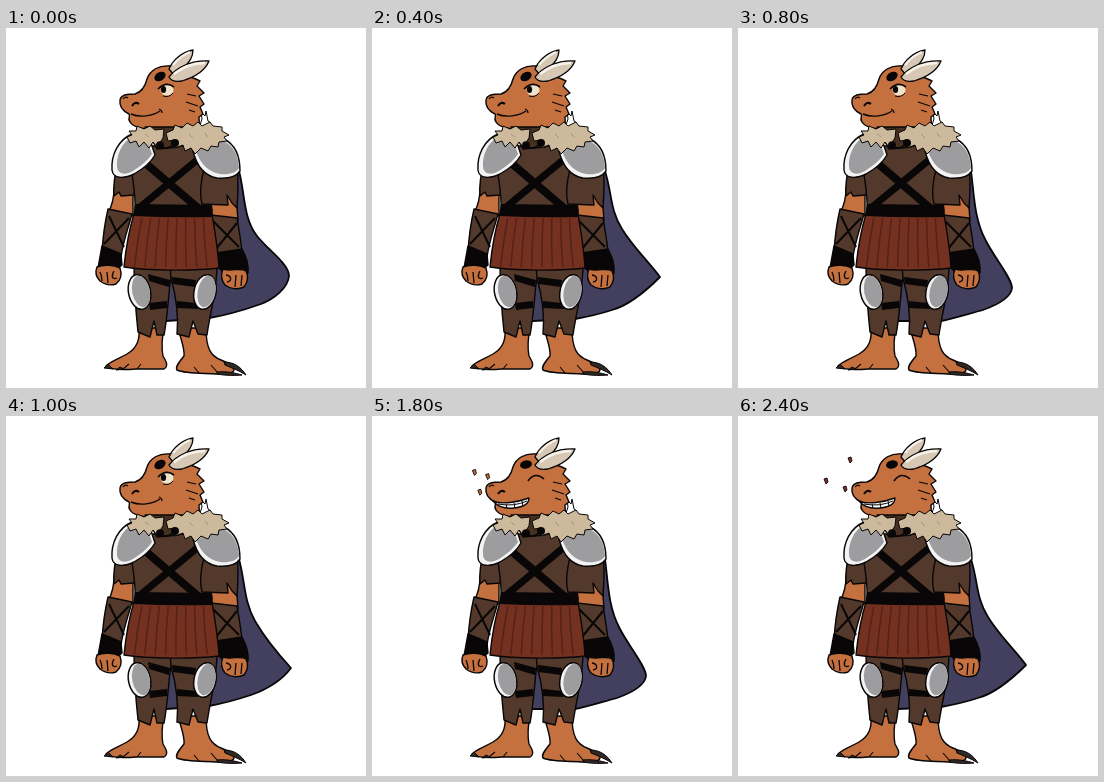
An HTML page with a canvas that plays this animation: 360 px wide and 360 px high, repeating every 2.6 s.

```html
<!DOCTYPE html>
<html lang="en">
<head>
<meta charset="utf-8">
<title>Caped dragon knight</title>
<style>
html, body { margin: 0; width: 100%; height: 100%; overflow: hidden; background: #fff; }
canvas { display: block; width: 100vw; height: 100vh; }
</style>
</head>
<body>
<canvas id="stage" width="360" height="360"></canvas>
<script>
const ctx = document.getElementById('stage').getContext('2d');
const STEP = 200, LOOP = 2600, LAUGH = 8;
const INK = '#080606', SKIN = '#c4703f', LEATHER = '#53392b', KILT = '#743120',
      CLOTH = '#43405f', FUR = '#cdba9c', STEEL = '#9d9d9f', SHINE = '#f3f3f3', BONE = '#d6c8b4';

function fill(d, color, width = 1.4) {
  const p = new Path2D(d);
  ctx.fillStyle = color;
  ctx.fill(p);
  if (width) {
    ctx.strokeStyle = INK;
    ctx.lineWidth = width;
    ctx.stroke(p);
  }
}

function line(d, width = 1.4, color = INK) {
  ctx.strokeStyle = color;
  ctx.lineWidth = width;
  ctx.stroke(new Path2D(d));
}

function oval(x, y, rx, ry, turn, color, width = 0) {
  ctx.beginPath();
  ctx.ellipse(x, y, rx, ry, turn, 0, Math.PI * 2);
  ctx.fillStyle = color;
  ctx.fill();
  if (width) {
    ctx.strokeStyle = INK;
    ctx.lineWidth = width;
    ctx.stroke();
  }
}

// Outer edge of the cape, from the shoulder round to the hem.
const capes = {
  rest: 'C239 165 237 190 251 208 C262 222 283 236 283 248 C282 260 268 271 255 276 C238 282 222 287 203 290',
  flare: 'C240 165 238 182 250 201 C261 219 276 233 288 249 C275 262 258 277 240 282 C228 286 214 289 203 291',
  tuck: 'C236 165 236 190 247 211 C255 228 274 250 274 260 C273 270 256 278 245 282 C230 286 214 291 203 293',
  swing: 'C239 165 238 186 249 205 C259 222 273 239 285 252 C276 264 262 273 245 279 C230 284 214 288 203 290',
  reach: 'C239 165 239 186 250 204 C261 222 276 241 287 258 C272 266 260 274 246 280 C230 286 214 290 203 291'
};
const cycle = ['rest', 'rest', 'flare', 'tuck', 'tuck', 'swing', 'swing', 'reach', 'tuck', 'tuck'];

function cape(name) {
  fill('M233 143 ' + capes[name] + ' L160 293 L160 240 L196 150Z', CLOTH, 1.8);
}

function legs() {
  fill('M133 300 C134 312 131 320 121 326 C112 331 103 334 100 338 C105 342 118 342 130 341 L158 341 C163 338 160 333 157 328 C155 318 156 310 158 300Z', SKIN);
  fill('M172 300 C175 312 179 321 178 328 C173 334 169 339 171 342 C180 346 196 345 212 346 L225 345 C233 341 224 336 215 332 C205 328 200 321 200 300Z', SKIN);
  line('M123 336 L117 341 M135 336 L131 341 M188 339 L193 345 M205 337 L212 345', 1.1);
  fill('M102 336 L98 340 L107 341Z M114 339 L110 342 L118 341Z', '#302824', 1);
  fill('M218 334 C228 334 235 339 240 347 C232 342 226 340 219 337Z M211 344 C221 343 229 345 236 347 C225 348 216 347 211 346Z', '#302824', 1);

  fill('M128 237 L168 237 L164 256 C162 275 161 292 158 307 L151 307 L148 293 L144 309 L132 304 C130 285 128 262 128 237Z', LEATHER);
  fill('M164 237 L211 237 C211 262 204 285 201 307 L192 306 L187 293 L183 309 L171 306 C173 285 170 268 165 250Z', LEATHER);
  fill('M142 246 L164 252 L163 259 L143 253Z M143 275 L161 273 L161 280 L144 282Z', INK, 0);
  fill('M166 249 L190 252 L189 259 L167 256Z M171 273 L190 275 L192 281 L171 280Z', INK, 0);
  kneepad(133.5, 264, -0.2);
  kneepad(199, 264, 0.2);
}

function kneepad(x, y, turn) {
  oval(x, y, 11, 17.5, turn, SHINE, 1.5);
  oval(x + 1.5, y - .5, 8.8, 16, turn, STEEL);
}

function arms() {
  fill('M108 160 L127 160 L127 188 L102 185 C106 178 108 171 108 160Z', SKIN);
  fill('M200 165 L230 165 L232 193 L205 190Z', SKIN);

  fill('M102 181 L126 186 C122 201 117 214 115 229 L96 224 C97 207 99 194 102 181Z', LEATHER);
  line('M103 188 L118 219 M123 190 L98 216', 2);
  fill('M96 218 L115 226 L116 237 L109 243 L92 240Z', INK);
  fill('M91 239 C98 236 108 237 114 240 C116 246 115 252 110 256 C104 258 98 256 94 253 C90 249 89 244 91 239Z', SKIN);
  line('M94 244 Q96 248 96 253 M101 244 L102 255 M108 243 C105 248 106 252 111 250', 1.3);

  fill('M205 187 L231 190 C233 202 235 213 236 224 L211 228 C207 215 205 201 205 187Z', LEATHER);
  line('M207 193 L233 219 M231 195 L210 221', 2);
  fill('M210 225 L236 221 C240 228 243 236 242 245 L222 248 L208 236Z', INK);
  fill('M217 241 C226 244 234 239 240 243 C243 249 241 255 238 259 C232 262 224 261 219 257 C214 251 215 246 217 241Z', SKIN);
  line('M236 247 L235 258 M230 247 L229 259 M220 247 C226 248 226 253 221 254', 1.3);
}

function torso() {
  fill('M112 133 C109 145 107 156 108 168 L113 164 L115 168 L128 167 L132 140Z', LEATHER);
  fill('M119 118 L210 118 L206 149 C203 160 205 172 206 184 L129 184 C130 168 127 154 125 139Z', LEATHER);
  fill('M198 141 L231 141 C233 154 232 166 231 180 L226 175 L221 167 L222 177 L196 176 C193 165 195 153 198 141Z', LEATHER);
  line('M138 134 L192 180', 8);
  line('M191 132 L133 180', 7);
}

function kilt() {
  fill('M128 186 L206 186 C209 204 212 221 213 240 C190 243 142 243 118 239 C120 219 123 202 128 186Z', KILT);
  for (let i = 1; i < 9; i++) {
    const top = 127 + i * 8.8, low = 118 + i * 10.4;
    line(`M${top} 190 Q${(top + low) / 2 - 1} 215 ${low} 239`, 1.5, '#54221a');
  }
  fill('M129 176 L206 177 L207 189 Q166 190 127 188Z', INK, 0);
}

function pads() {
  fill('M126 106 C112 112 105 127 106 142 C107 151 118 151 128 146 C137 141 145 134 149 127 L144 112Z', SHINE);
  fill('M127 108 C116 114 110 127 111 139 C112 147 120 147 127 143 C135 138 142 132 146 126 L141 112Z', STEEL, 0);
  fill('M187 123 C191 139 199 148 211 150 C221 151 230 149 234 143 C234 128 230 117 218 111Z', SHINE);
  fill('M190 123 C195 137 203 144 214 146 C223 147 230 145 233 140 C232 127 228 118 216 112Z', STEEL, 0);
}

function collar() {
  fill('M139 99 L186 99 L173 119 L151 121Z', '#46301f');
  fill('M121 109 L126 107 L123 103 L130 103 L131 98 L138 101 L144 98 L149 102 L158 101 L157 110 L151 119 L147 114 L143 120 L138 114 L133 119 L130 113 L124 115Z', FUR, 1);
  fill('M160 105 L167 102 L169 97 L176 100 L181 95 L187 98 L192 94 L196 98 L204 94 L207 98 L216 99 L216 103 L223 107 L218 109 L221 113 L213 114 L212 119 L205 118 L202 123 L195 120 L189 126 L185 120 L179 123 L177 117 L169 120 L169 112 L162 113Z', FUR, 1);
  line('M139 106 L143 109 M183 106 L187 110 M199 105 L202 109', 1, '#a99473');
  oval(154, 117, 4, 3.8, 0, INK);
  oval(169, 115, 4, 4, 0, INK);
  line('M153 117 Q160 124 169 115', 1.4);
}

function head(laugh) {
  fill('M193 100 L196 91 L195 84 L199 88 L200 83 L202 93 L205 95Z', '#fff', 1);
  fill('M114 72 C115 66 123 66 129 66 C136 64 139 59 141 51 C144 42 153 37 164 38 L175 47 C183 48 190 51 194 53 L191 58 L198 65 L193 68 L198 76 L194 79 L197 86 L193 89 C193 95 195 99 189 101 C174 105 158 101 148 101 C136 101 127 99 124 94 C121 90 125 88 123 86 C117 83 113 79 114 72Z', SKIN);
  line('M181 66 L190 68 M180 74 L192 78 M183 82 L189 84', 1.2);
  horn('M163 41 C167 32 176 24 187 22 C187 29 183 35 177 40 L168 47Z', 'M167 37 Q174 28 184 24');
  horn('M163 49 C170 40 184 32 203 33 C199 43 189 49 176 53 C170 54 165 53 163 49Z', 'M168 46 C177 39 187 35 199 35');
  oval(154, 48.5, 6, 4.2, laugh ? -0.2 : -0.5, INK);
  line('M126 78 Q129 73 133 76', 2);
  line('M117 71 Q119 68 122 70', 1.2);
  if (laugh) {
    line('M156 65 Q163 55 172 63', 1.6);
    fill('M121 85 C130 89 146 86 157 82 C157 88 151 91 142 92 C133 93 126 91 121 85Z', '#fff', 1.4);
    line('M126 88 Q142 91 155 85 M134 88 L135 92 M142 87 L143 92 M150 85 L151 90', 1);
  } else {
    oval(161, 62, 6.5, 5.5, 0, '#eee4cc');
    oval(157.5, 61.5, 2.6, 3.5, 0, INK);
    line('M152 61 Q160 53 168 59', 1.7);
    line('M157 68 Q163 70 167 65', 1);
    line('M125 86 C134 90 147 88 154 83', 1.4);
    line('M153 81 Q156 82 156 85', 1.2);
  }
}

function horn(shape, glint) {
  fill(shape, BONE, 1.3);
  line(glint, 2.4, '#f6f2ea');
}

// Two bursts of flecks; each flies out from the snout and stops at these points.
const bursts = [
  { color: '#c96a35', ends: [[92, 50], [114, 57], [101, 83]] },
  { color: '#8a2e2c', ends: [[112, 44], [88, 65], [107, 73]] }
];

function flecks(n) {
  if (n < 0) return;
  const { color, ends } = bursts[n >> 1], reach = n % 2 ? 1 : .6;
  for (const [ex, ey] of ends) {
    const x = 118 + (ex - 118) * reach, y = 66 + (ey - 66) * reach;
    fill(`M${x - 2} ${y - 2} L${x + 1} ${y - 3} L${x + 2} ${y + 1} L${x} ${y + 3}Z`, color, .9);
  }
}

function draw(t) {
  const i = Math.floor(t % LOOP / STEP);
  ctx.fillStyle = '#fff';
  ctx.fillRect(0, 0, 360, 360);
  ctx.lineJoin = 'round';
  cape(cycle[i % cycle.length]);
  legs();
  arms();
  torso();
  kilt();
  pads();
  head(i >= LAUGH);
  collar();
  flecks(i - LAUGH - 1);
}

const start = performance.now();
function tick() {
  draw(performance.now() - start);
  requestAnimationFrame(tick);
}
tick();
</script>
</body>
</html>
```
